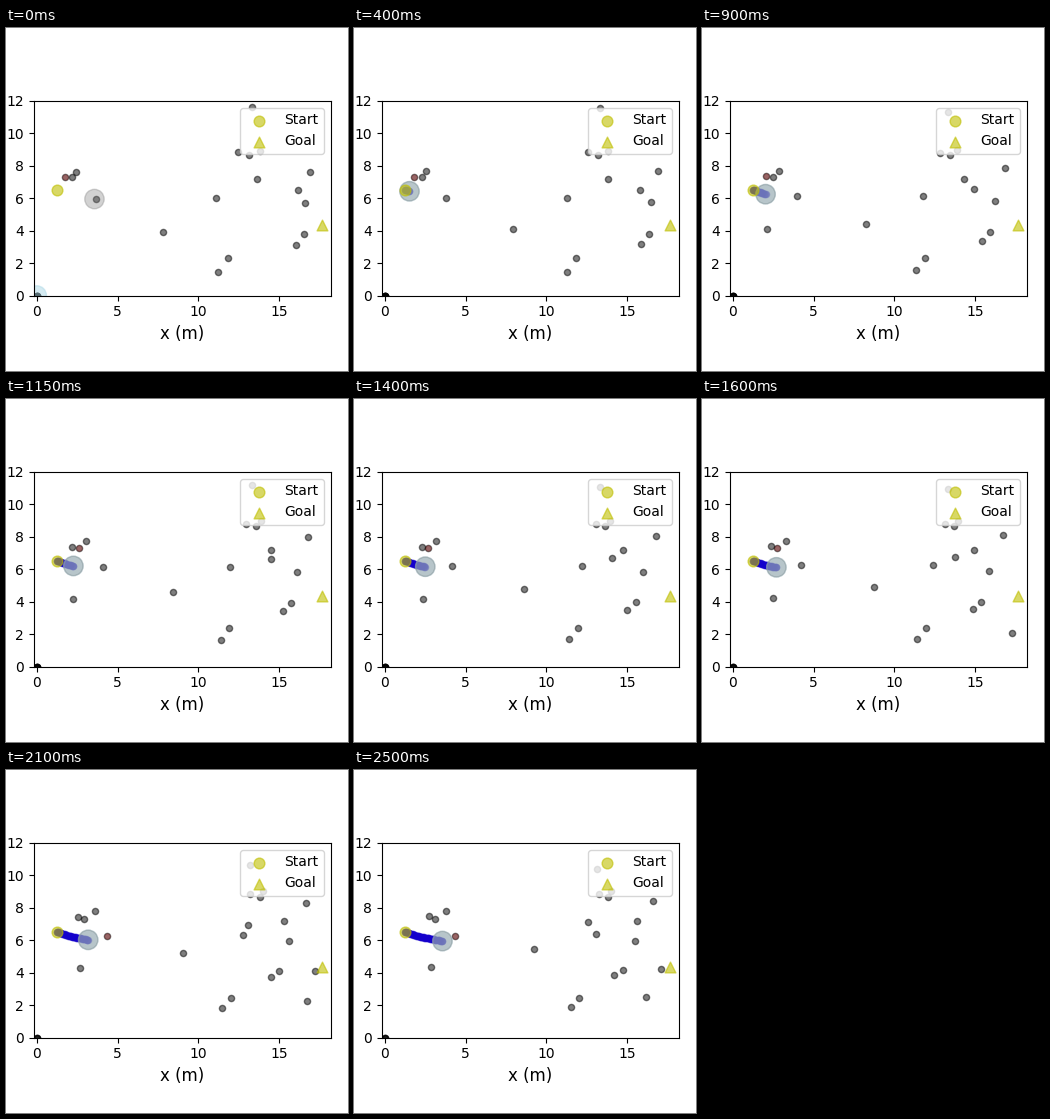
A matplotlib script for the animation above (3050 ms loop, 342 px wide and 343 px high).

```python
import numpy as np
import matplotlib.pyplot as plt
from matplotlib.animation import FuncAnimation
from matplotlib.patches import Circle

W, H, DPI = 342, 343, 100
STEP_MS, LAST, FRAMES = 50, 50, 61
LAG = 5.0          # frames a walker needs to reach its speed
RADIUS = 0.6
START, GOAL = (1.25, 6.53), (17.64, 4.36)

# walkers present from the beginning: x, y at the start and at the end
STEADY = [
    (1.72, 7.30, 2.71, 7.48),
    (2.18, 7.33, 3.08, 7.30),
    (2.40, 7.64, 3.79, 7.82),
    (7.78, 3.93, 9.26, 5.44),
    (11.09, 6.00, 13.07, 6.37),
    (11.24, 1.42, 11.52, 1.86),
    (11.80, 2.29, 12.02, 2.44),
    (13.78, 8.91, 14.00, 9.03),
    (13.62, 7.17, 15.60, 7.17),
    (16.62, 5.72, 15.45, 5.97),
    (16.93, 7.61, 16.62, 8.41),
    (16.50, 3.77, 14.74, 4.14),
    (16.04, 3.09, 14.21, 3.83),
]
# the same, with the sideways bend at half way
CURVED = [
    (12.45, 8.87, 13.25, 8.87, 0.15, -0.06),
    (13.10, 8.66, 13.81, 8.66, 0.13, 0.0),
    (13.31, 11.66, 13.13, 10.42, 0.10, 0.09),
    (16.16, 6.52, 12.57, 7.14, -0.07, -0.18),
]
# the same, with the first and last frame of the walk
TIMED = [
    (3.67, 5.97, 4.32, 6.28, 0, 36),
    (17.30, 2.07, 16.16, 2.47, 31, 50),
    (17.24, 4.11, 17.06, 4.21, 42, 50),
    (2.07, 4.11, 2.86, 4.33, 12, 50),
]
IDLE = np.zeros((3, 2))   # walkers that never leave the origin


def travel(t):
    """Distance covered at unit speed after accelerating from rest."""
    return t - LAG * (1 - np.exp(-t / LAG))


def walk(t, ax0, ay0, bx, by, bend=(0, 0), first=0, last=LAST):
    if t < first:
        return np.zeros(2)
    s = min(1.0, travel(t - first) / travel(last - first))
    arc = s * (1 - s)
    a, b = np.array([ax0, ay0]), np.array([bx, by])
    return a + (b - a) * (s + 0.2 * arc) + 4 * arc * np.array(bend)


def crowd_at(t):
    spots = [walk(t, *w) for w in STEADY]
    spots += [walk(t, *w[:4], bend=w[4:]) for w in CURVED]
    spots += [walk(t, *w[:4], first=w[4], last=w[5]) for w in TIMED]
    return np.array(spots)


def robot_at(t):
    u, keys = travel(t), travel(np.array([0, 8, 18, LAST]))
    return np.column_stack([np.interp(u, keys, [1.25, 1.53, 2.03, 3.57]),
                            np.interp(u, keys, [6.53, 6.43, 6.25, 5.95])])


ROUTE = robot_at(np.arange(LAST + 1))

plt.rcParams["font.family"] = "DejaVu Sans"
fig = plt.figure(figsize=(W / DPI, H / DPI), dpi=DPI, facecolor="white")
left, right, top, bottom = 27.5, 325.0, 73.0, 267.5
ax = fig.add_axes([left / W, 1 - bottom / H, (right - left) / W, (bottom - top) / H])
ax.set_xlim(-0.2, 18.2)
ax.set_ylim(0, 12)
ax.set_xticks(range(0, 16, 5))
ax.set_yticks(range(0, 13, 2))
ax.set_xlabel("x (m)", fontsize=12)

crowd = ax.scatter([], [], s=20, color="black", alpha=0.5, zorder=1)
nearest = ax.scatter([], [], s=20, color="red", alpha=0.2, linewidths=0, zorder=1.1)
trail = ax.scatter([], [], s=20, color=(0.08, 0, 0.8), alpha=0.5, zorder=1.2)
halo = ax.add_patch(Circle((0, 0), RADIUS, color="lightblue", alpha=0.5, zorder=1.3))
body = ax.add_patch(Circle((0, 0), RADIUS, color="gray", alpha=0.35, zorder=1.4))
ax.scatter(*START, s=60, color="y", alpha=0.6, label="Start", zorder=1.5)
ax.scatter(*GOAL, s=60, color="y", alpha=0.6, marker="^", label="Goal", zorder=1.5)
ax.legend(loc="upper right")


def draw(i):
    t = min(i, LAST)
    spots = crowd_at(t)
    crowd.set_offsets(np.vstack([spots, IDLE]))
    gap = np.hypot(*(spots - ROUTE[t]).T)
    nearest.set_offsets(spots[[gap.argmin()]])
    trail.set_offsets(ROUTE[1:t + 1])
    # before moving, the body rests at the route's end and the halo at the origin
    halo.center = tuple(ROUTE[t]) if t else (0, 0)
    body.center = tuple(ROUTE[t if t else LAST])
    return crowd, nearest, trail, halo, body


anim = FuncAnimation(fig, draw, frames=FRAMES, init_func=lambda: draw(0),
                     interval=STEP_MS, repeat=True, repeat_delay=0, blit=False)
plt.show()
```
